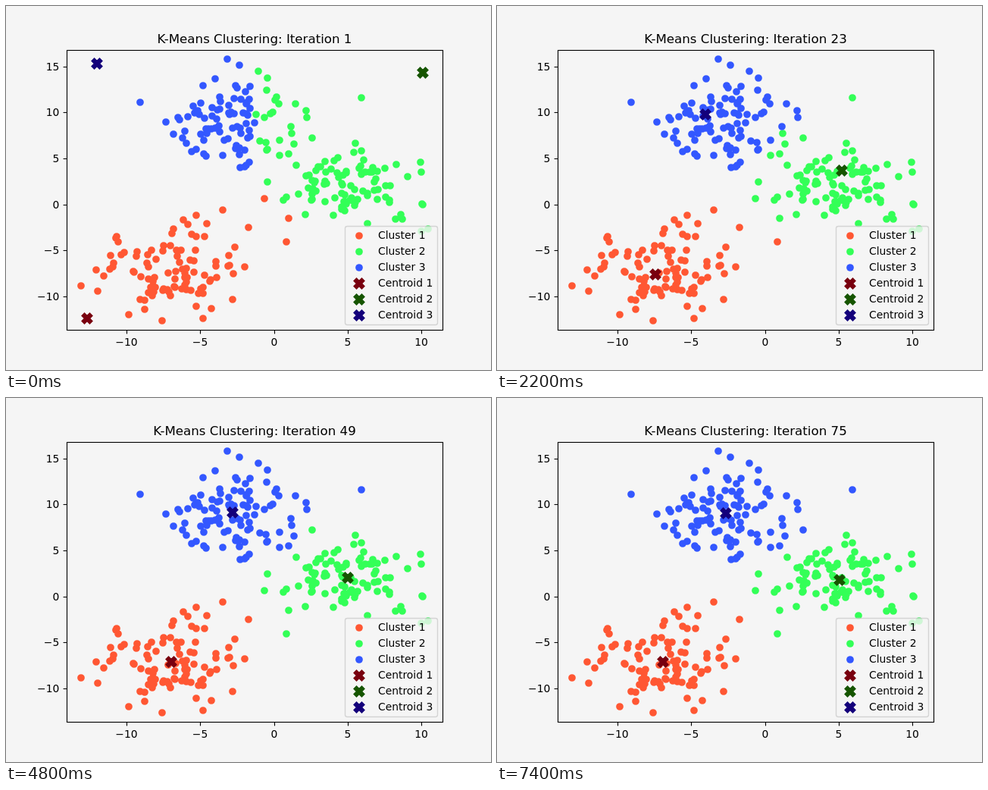
These frames come from a looping animation (640x480 px, 7.5 s). An HTML page:

```html
<!DOCTYPE html>
<html lang="en">
<head>
<meta charset="utf-8">
<title>K-Means Clustering</title>
<style>
  html, body { margin: 0; width: 100%; height: 100%; overflow: hidden; background: #f5f5f5; }
  svg { display: block; width: 640px; height: 480px; }
  text { font: 13.889px "DejaVu Sans", sans-serif; fill: #000; }
  #title { font-size: 16.667px; text-anchor: middle; }
  .line { fill: none; stroke: #000; stroke-width: 1.11; }
</style>
</head>
<body>
<svg id="stage" viewBox="0 0 640 480"></svg>
<script>
const STEP_MS = 100, STEPS = 75, RATE = 0.1;
const PER_BLOB = 100, SPREAD = 2.5;
const DOT = 9.72;
const COLORS = ['#ff5733', '#33ff57', '#3357ff'];
const DARK = ['#79000f', '#165500', '#14007b'];
const START = [[-13.34, -13.02], [10.74, 15.54], [-12.95, 16]];
const BOX = { left: 80, top: 57.6, right: 576, bottom: 427.2 };

// Mersenne Twister with 53-bit uniforms and polar normals
function makeRandom(seed) {
  const N = 624, M = 397, mt = new Uint32Array(N);
  mt[0] = seed;
  for (let i = 1; i < N; i++) {
    mt[i] = Math.imul(1812433253, mt[i - 1] ^ (mt[i - 1] >>> 30)) + i;
  }
  let index = N, spare = null;
  function twist() {
    for (let i = 0; i < N; i++) {
      const y = (mt[i] & 0x80000000) | (mt[(i + 1) % N] & 0x7fffffff);
      mt[i] = mt[(i + M) % N] ^ (y >>> 1) ^ (y & 1 ? 0x9908b0df : 0);
    }
    index = 0;
  }
  function word() {
    if (index === N) twist();
    let y = mt[index++];
    y ^= y >>> 11;
    y ^= (y << 7) & 0x9d2c5680;
    y ^= (y << 15) & 0xefc60000;
    return (y ^ (y >>> 18)) >>> 0;
  }
  function uniform() {
    const high = word() >>> 5, low = word() >>> 6;
    return (high * 67108864 + low) / 9007199254740992;
  }
  function normal() {
    if (spare !== null) {
      const kept = spare;
      spare = null;
      return kept;
    }
    let a, b, r;
    do {
      a = 2 * uniform() - 1;
      b = 2 * uniform() - 1;
      r = a * a + b * b;
    } while (r >= 1 || r === 0);
    const f = Math.sqrt(-2 * Math.log(r) / r);
    spare = f * a;
    return f * b;
  }
  return { uniform, normal };
}

function makePoints() {
  const random = makeRandom(42);
  const coord = () => random.uniform() * 20 - 10;
  const centers = [0, 1, 2].map(() => [coord(), coord()]);
  return centers.flatMap(center => Array.from({ length: PER_BLOB },
    () => center.map(c => c + SPREAD * random.normal())));
}

const points = makePoints();
const limits = axis => {
  const values = points.map(p => p[axis]);
  return [Math.min(...values) - 1, Math.max(...values) + 1];
};
const [x0, x1] = limits(0), [y0, y1] = limits(1);
const toX = x => Math.round(BOX.left + (BOX.right - BOX.left) * (x - x0) / (x1 - x0));
const toY = y => Math.round(BOX.bottom - (BOX.bottom - BOX.top) * (y - y0) / (y1 - y0));

function nearest(point, centroids) {
  const d = centroids.map(c => Math.hypot(point[0] - c[0], point[1] - c[1]));
  return d.indexOf(Math.min(...d));
}

// Each step assigns the points, then moves each centroid part of the way to its mean
function simulate() {
  let centroids = START;
  return Array.from({ length: STEPS }, () => {
    const groups = [[], [], []];
    for (const p of points) groups[nearest(p, centroids)].push(p);
    centroids = centroids.map((c, k) => c.map((value, axis) => {
      const mean = groups[k].reduce((sum, p) => sum + p[axis], 0) / groups[k].length;
      return value + RATE * (mean - value);
    }));
    return {
      dots: groups.map(g => g.map(p => `M${toX(p[0])} ${toY(p[1])}h0`).join('')),
      marks: centroids.map(c => `translate(${toX(c[0])} ${toY(c[1])})`)
    };
  });
}

const stage = document.getElementById('stage');
function add(tag, attrs, content = '') {
  const node = document.createElementNS('http://www.w3.org/2000/svg', tag);
  for (const key in attrs) node.setAttribute(key, attrs[key]);
  node.textContent = content;
  return stage.appendChild(node);
}
const addDots = (color, d = '') => add('path', {
  d, stroke: color, 'stroke-width': DOT, 'stroke-linecap': 'round', fill: 'none'
});
const addMark = (color, x = 0, y = 0) => add('path', {
  d: 'M-1 2 0 1 1 2 2 1 1 0 2-1 1-2 0-1-1-2-2-1-1 0-2 1Z'.replace(/-?\d/g, n => ' ' + n * 3.472),
  fill: color, stroke: color, 'stroke-width': 1.389, transform: `translate(${x} ${y})`
});
const label = n => String(n).replace('-', '\u2212');

const dotPaths = COLORS.map(color => addDots(color));
for (const n of [-10, -5, 0, 5, 10]) {
  const x = toX(n);
  add('path', { class: 'line', d: `M${x + 0.5} 427.5v4.9` });
  add('text', { x, y: 448, 'text-anchor': 'middle' }, label(n));
}
for (const n of [-10, -5, 0, 5, 10, 15]) {
  const y = toY(n);
  add('path', { class: 'line', d: `M80.5 ${y + 0.5}h-4.9` });
  add('text', { x: 70.3, y: y + 5, 'text-anchor': 'end' }, label(n));
}
const marks = DARK.map(color => addMark(color));
add('rect', { class: 'line', x: 80.5, y: 58.5, width: 496, height: 369 });
const title = add('text', { id: 'title', x: 328, y: 49 });

add('rect', {
  x: 447.5, y: 290.5, width: 122, height: 130, rx: 2.8,
  fill: '#f5f5f5', stroke: '#ccc', 'stroke-width': 1.389, opacity: 0.8
});
for (let i = 0; i < 6; i++) {
  const y = 303 + 21 * i, k = i % 3;
  if (i < 3) addDots(COLORS[k], `M466 ${y}h0`);
  else addMark(DARK[k], 466, y);
  add('text', { x: 491, y: y + 4 }, `${i < 3 ? 'Cluster' : 'Centroid'} ${k + 1}`);
}

const steps = simulate();
let shown = -1;
function render(ms) {
  const i = Math.floor(ms / STEP_MS) % STEPS;
  if (i === shown) return;
  shown = i;
  title.textContent = `K-Means Clustering: Iteration ${i + 1}`;
  dotPaths.forEach((path, k) => path.setAttribute('d', steps[i].dots[k]));
  marks.forEach((mark, k) => mark.setAttribute('transform', steps[i].marks[k]));
}

const start = performance.now();
function tick() {
  render(performance.now() - start);
  requestAnimationFrame(tick);
}
render(0);
requestAnimationFrame(tick);
</script>
</body>
</html>
```
